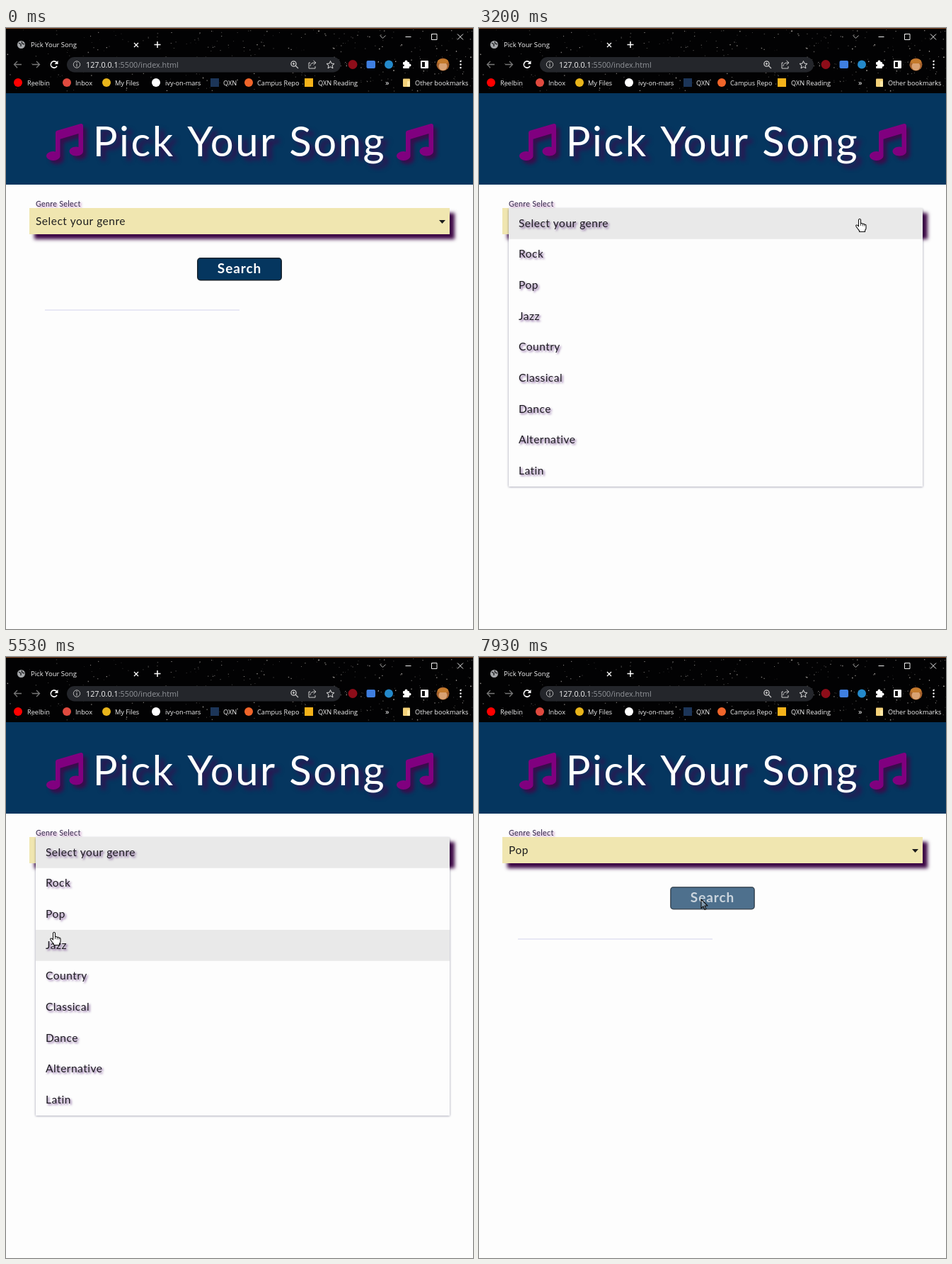
An HTML page with a canvas that plays this animation: 660 px wide and 848 px high, repeating every 8000 ms.

```html
<!DOCTYPE html>
<html lang="en">
<head>
<meta charset="utf-8">
<title>Pick Your Song</title>
<style>
html, body { margin: 0; width: 100%; height: 100%; overflow: hidden; background: #fdfdfd; }
canvas { display: block; width: 660px; height: 848px; }
</style>
</head>
<body>
<canvas id="stage" width="660" height="848"></canvas>
<script>
const W = 660, H = 848, LOOP = 8000;
const ROUND = 'Lato, sans-serif', UI = '"Open Sans", sans-serif';
const NAVY = '#05365f', PURPLE = '#80007f';
const MENU = { x: 42, y: 254, w: 585, row: 43.67 };
const GENRES = ['Select your genre', 'Rock', 'Pop', 'Jazz', 'Country', 'Classical', 'Dance', 'Alternative', 'Latin'];
const OPEN_AT = 2900, PICK_AT = 6340, CLOSE_AT = 6380, HOVER_AT = 7680;
const ctx = document.getElementById('stage').getContext('2d');
let g = ctx;

function rect(x, y, w, h, fill, r = 0) {
  g.beginPath();
  g.roundRect(x, y, w, h, r);
  g.fillStyle = fill;
  g.fill();
}

function disc(x, y, r, fill) {
  g.beginPath();
  g.arc(x, y, r, 0, 7);
  g.fillStyle = fill;
  g.fill();
}

function ring(x, y, r, color, from = 0, to = 7) {
  g.beginPath();
  g.arc(x, y, r, from, to);
  g.strokeStyle = color;
  g.stroke();
}

function lines(d, color, width = 1.2) {
  g.strokeStyle = color;
  g.lineWidth = width;
  g.stroke(new Path2D(d));
}

function label(str, x, y, size, color, { font = UI, weight = 400, align = 'left', space = 0 } = {}) {
  g.font = `${weight} ${size}px ${font}`;
  g.letterSpacing = space + 'px';
  g.textAlign = align;
  g.fillStyle = color;
  g.fillText(str, x, y);
}

function shadowed(color, dx, dy, blur, draw) {
  g.save();
  Object.assign(g, { shadowColor: color, shadowOffsetX: dx, shadowOffsetY: dy, shadowBlur: blur });
  draw();
  g.restore();
}

function layer(draw) {
  const canvas = document.createElement('canvas');
  canvas.width = W;
  canvas.height = H;
  g = canvas.getContext('2d');
  draw();
  g = ctx;
  return canvas;
}

function drawStars() {
  let seed = 41;
  const rnd = () => (seed = seed * 16807 % 2147483647) / 2147483647;
  for (let i = 0; i < 380; i++) {
    const x = W * Math.pow(rnd(), 0.75), y = 2 + rnd() * 88, s = 0.6 + rnd() * 0.9;
    g.globalAlpha = 0.2 + 0.7 * rnd() ** 2;
    rect(x, y, s, s, '#dcd6d0');
  }
  g.globalAlpha = 1;
}

function drawWindowBar() {
  disc(21.5, 23.5, 5.5, '#a5a7aa');
  lines('M18 21l3 2 0 3M22 19l1 3 3 1', '#2a2b2d', 1.5);
  label('Pick Your Song', 35, 27, 9.5, '#f2f2f2');
  lines('M181 21l6 6M187 21l-6 6', '#fff', 1.3);
  lines('M209.5 23.5h9M214 19v9', '#fff', 1.5);
  lines('M528.5 10.5l4 4 4-4', '#aaa', 1);
  lines('M564.5 12.5h8M601.5 8.5h7.5v8h-7.5zM638 8.5l8 8M646 8.5l-8 8', '#eee', 1);
}

function drawToolbar() {
  lines('M22 51.5h-10M16 47l-4.5 4.5 4.5 4.5M37 51.5h10M43 47l4.5 4.5-4.5 4.5', '#777', 1.3);
  g.lineWidth = 1.6;
  ring(68, 51.5, 4.6, '#fff', 0.5, 5.6);
  g.fillStyle = '#fff';
  g.fill(new Path2D('M73.5 46v5h-5z'));

  rect(86, 41, 387, 21.5, '#24262b', 11);
  g.lineWidth = 1;
  ring(100, 51.5, 4.7, '#bbb');
  lines('M100 50.5v4M100 48v1.2', '#bbb', 1.1);
  label('127.0.0.1', 113, 55.5, 10.8, '#f4f4f4');
  label(':5500/index.html', 113 + g.measureText('127.0.0.1').width, 55.5, 10.8, '#92959a');
  g.lineWidth = 1.3;
  ring(406.5, 50.5, 3.6, '#ccc');
  lines('M409 53l4 4M404.8 50.5h3.4M406.5 48.8v3.4', '#ccc', 1.1);
  lines('M430 49h-2v8h9v-3M430 54c0-4 3-5 7-5M434.5 46l3.5 3-3.5 3', '#ccc', 1);
  lines('M458.5 46.5l1.5 3.6 4 .3-3 2.6 1 3.9-3.5-2.1-3.5 2.1 1-3.9-3-2.6 4-.3z', '#ddd', 1);

  disc(490, 51.5, 6.5, '#8d0d19');
  rect(509.5, 46, 12.5, 11, '#3f7fe0', 2);
  disc(541, 51.5, 6, '#2489ca');
  rect(561, 48, 9, 9, '#fff', 1);
  disc(565.5, 47.5, 2, '#fff');
  disc(570.5, 52.5, 2, '#fff');
  disc(561.5, 52.8, 1.4, '#111');
  rect(586, 46, 11, 11, '#fff', 1);
  rect(588, 48, 4, 7, '#111');

  g.save();
  g.beginPath();
  g.arc(617.5, 51.5, 9, 0, 7);
  g.clip();
  rect(608, 42, 19, 19, '#a4602b');
  disc(617.5, 54, 6, '#d9a273');
  rect(610, 44, 15, 6, '#c47a2c', 3);
  g.restore();
  for (const y of [47, 51.5, 56]) disc(642.5, y, 1.2, '#fff');
}

function drawBookmarks() {
  const marks = [
    [17, 30, 'Reelbin', '#f00'], [86, 98, 'Inbox', '#e04a3f'], [142, 154, 'My Files', '#e9b51b'],
    [212, 225, 'ivy-on-mars', '#fff'], [295, 307, 'QXN', '#1c3558', 1], [343, 355, 'Campus Repo', '#f0652a'],
    [428, 441, 'QXN Reading', '#f5b31a', 1]
  ];
  for (const [cx, x, name, color, square] of marks) {
    if (square) rect(cx - 6, 71, 12, 12, color);
    else disc(cx, 77, 6, color);
    label(name, x, 80.5, 9.2, '#f2f2f2');
  }
  label('»', 536, 80.5, 11, '#fff');
  rect(561, 71.5, 10, 11.5, '#f4d27a', 1);
  rect(567, 75, 4, 8, '#ffe9a8', 1);
  label('Other bookmarks', 578, 80.5, 9.2, '#f2f2f2');
}

function drawNote(x, y) {
  const shape = new Path2D('M15.3 9.7 47.8.2Q52-.5 52 3.3V39C52 42.6 47.6 45.5 42.3 45.5S32.5 42.6 32.5 39s4.4-6.5 9.8-6.5q1.7 0 3.2.4V14.1l-26 7.6V45.5C19.5 49 15 52 9.8 52S0 49 0 45.5 4.4 39 9.8 39q1.7 0 3.2.4V12.8Q13 10.4 15.3 9.7z');
  shadowed('#3a0c4c', 5, 5, 5, () => {
    g.translate(x, y);
    g.fillStyle = PURPLE;
    g.fill(shape);
  });
}

function drawBase() {
  rect(0, 0, W, H, '#fdfdfd');
  rect(0, 0, W, 92, '#020203');
  drawStars();
  rect(0, 0, W, 1, '#8a4f2c');
  drawWindowBar();
  drawToolbar();
  drawBookmarks();

  rect(0, 92, W, 129, NAVY);
  drawNote(57, 135);
  drawNote(552, 135);
  shadowed('#35104f', 7, 6, 6, () =>
    label('Pick Your Song', 330, 181, 58, '#fff', { font: ROUND, align: 'center', space: 2.6 }));

  shadowed('rgba(128,0,127,.5)', 2, 2, 3, () =>
    label('Genre Select', 42, 252, 10.7, '#33284a', { font: ROUND, space: 0.3 }));
  shadowed('#3d0745', 7, 7, 5, () => rect(33, 254, 594, 37, '#f0e6b0'));
  g.fillStyle = '#1c1c1c';
  g.fill(new Path2D('M612 271h9l-4.5 5z'));
  rect(55, 397.5, 275, 1, '#d3d3ee');
}

function drawMenuText() {
  GENRES.forEach((name, i) => shadowed('rgba(75,20,110,.7)', 2, 2, 3, () =>
    label(name, 56, 280.5 + i * MENU.row, 15.5, '#1d1a22', { font: ROUND, space: 0.5 })));
}

const base = layer(drawBase), menuText = layer(drawMenuText);

const clamp = v => Math.min(1, Math.max(0, v));
const smooth = v => v * v * (3 - 2 * v);
const outQuint = v => 1 - (1 - v) ** 5;

// time, x, y of the pointer tip
const PATH = [
  [1570, 668, 330], [2300, 541, 266], [2530, 543, 266], [2700, 538, 269], [3300, 538, 269],
  [4170, 241, 446], [4550, 205, 454], [5530, 68, 388], [6070, 92, 363], [6650, 92, 363],
  [7000, 180, 352], [7130, 180, 352], [7900, 314, 342], [LOOP, 314, 342]
];

function pointerAt(t) {
  const i = PATH.findIndex(key => key[0] > t);
  if (i < 1) return null;
  const [t0, x0, y0] = PATH[i - 1], [t1, x1, y1] = PATH[i];
  const k = smooth((t - t0) / (t1 - t0));
  return { x: x0 + (x1 - x0) * k, y: y0 + (y1 - y0) * k };
}

function drawSearch(t) {
  g.save();
  g.globalAlpha = 1 - 0.3 * clamp((t - HOVER_AT) / 200);
  // the border is a gap-free ring, so fading keeps one even tone
  rect(271, 325, 118, 30.5, NAVY, 3);
  g.lineWidth = 1.5;
  g.beginPath();
  g.roundRect(270.75, 324.75, 118.5, 31, 4);
  g.strokeStyle = '#16222d';
  g.stroke();
  label('Search', 330, 346, 19, '#fff', { font: ROUND, weight: 700, align: 'center', space: 0.9 });
  g.restore();
}

function drawMenu(t, pointer) {
  if (t < OPEN_AT || t > CLOSE_AT + 250) return;
  const shown = t < CLOSE_AT ? outQuint(clamp((t - OPEN_AT) / 150)) : 1 - outQuint((t - CLOSE_AT) / 250);
  const height = MENU.row * GENRES.length, scale = 0.3 + 0.7 * shown;
  const hover = pointer && Math.floor((pointer.y - MENU.y) / MENU.row);
  g.save();
  g.globalAlpha = shown;
  g.translate(MENU.x, MENU.y);
  g.scale(scale, scale);
  g.translate(-MENU.x, -MENU.y);
  shadowed('rgba(20,20,60,.45)', 0, 1, 3, () => rect(MENU.x, MENU.y, MENU.w, height, '#fdfdfd'));
  const shade = (i, color) => rect(MENU.x, MENU.y + i * MENU.row, MENU.w, MENU.row, color);
  if (t < PICK_AT) {
    shade(0, '#e9e9e9');
    if (hover > 0) shade(hover, '#e9e9e9');
  } else shade(2, '#f4f4f2');
  g.drawImage(menuText, 0, 0);
  g.restore();
}

const HAND = new Path2D('M-1.5 1.5Q0-1 1.5 1.5V7Q3.5 5.8 4.3 7.6 6 6.5 6.8 8.4 9 7.6 9 10v3.5Q9 15 7.5 16.5V18.5H-.5V17Q-2 15.5-5 11-6 9 -4 9-3 9-1.5 11z');
const ARROW = new Path2D('M0 0V12.5L2.9 9.8 5 14.5 7 13.6 5 9H9z');

function drawPointer(t, p) {
  const onMenu = t > OPEN_AT && t < CLOSE_AT + 150;
  const onField = p.x > 33 && p.x < 627 && p.y > 254 && p.y < 291;
  const shape = onMenu || onField ? HAND : ARROW;
  g.save();
  g.translate(p.x, p.y);
  g.fillStyle = shape === HAND ? '#fff' : 'rgba(255,255,255,.3)';
  g.strokeStyle = '#111';
  g.lineWidth = 1.1;
  g.lineJoin = 'round';
  g.fill(shape);
  g.stroke(shape);
  if (shape === HAND) lines('M1.5 7v3M4.3 8v2.5M6.8 8.6v2', '#111', 0.8);
  g.restore();
}

function frame(now) {
  const t = now % LOOP, pointer = pointerAt(t);
  g.drawImage(base, 0, 0);
  label(t < PICK_AT ? GENRES[0] : GENRES[2], 42, 277.5, 15.5, '#1e1e1e', { font: ROUND, space: 0.5 });
  drawSearch(t);
  drawMenu(t, pointer);
  if (pointer) drawPointer(t, pointer);
  requestAnimationFrame(frame);
}
requestAnimationFrame(frame);
</script>
</body>
</html>
```
